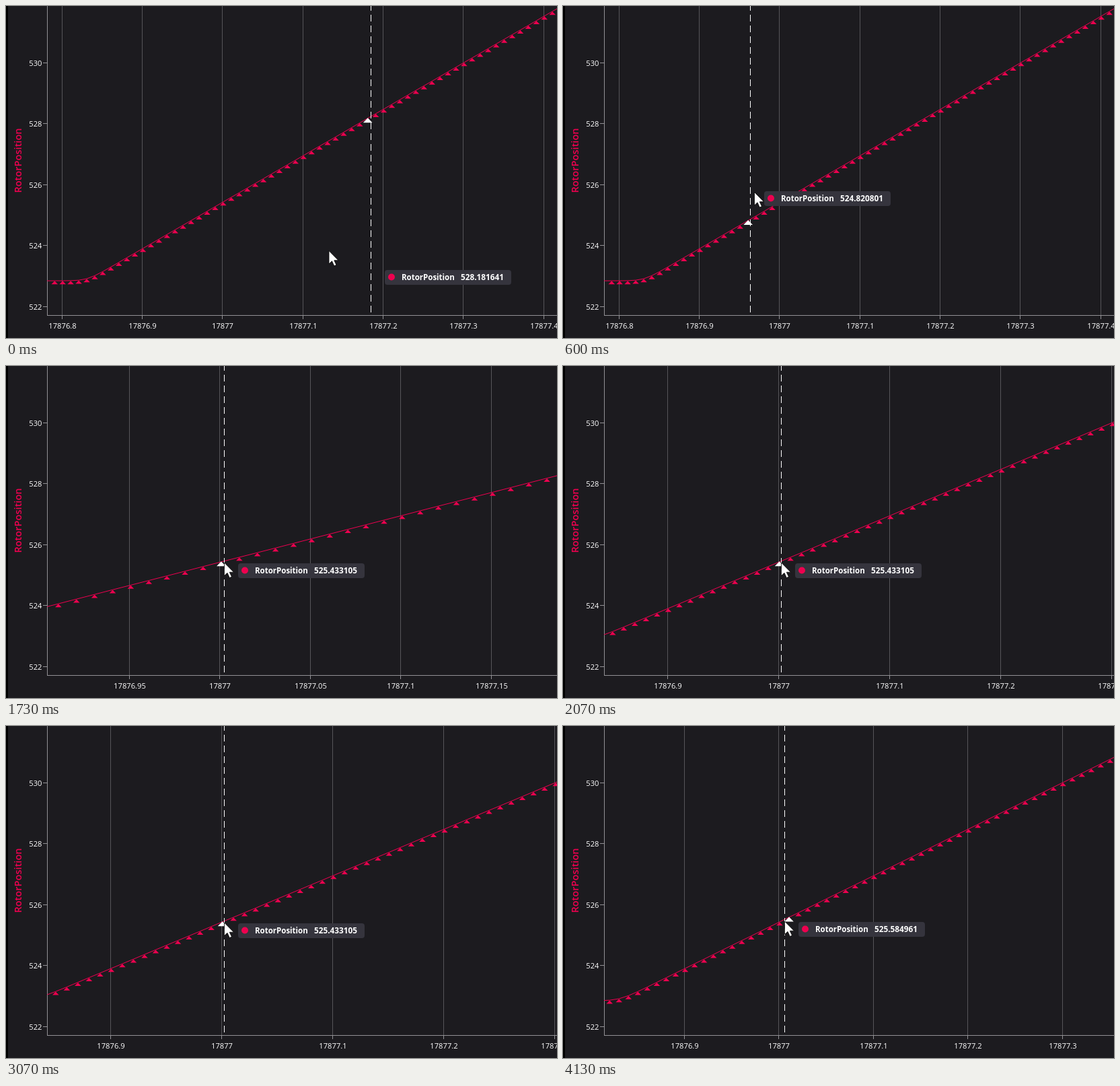
An HTML page with a canvas for the animation above (5340 ms loop, 819x493 px).

```html
<!DOCTYPE html>
<html lang="en">
<head>
<meta charset="utf-8">
<title>Rotor position chart</title>
<style>
  html, body { margin: 0; width: 100%; height: 100%; overflow: hidden; background: #1c1b1f; }
  canvas { display: block; }
</style>
</head>
<body>
<canvas id="chart" width="819" height="493"></canvas>
<script>
const ctx = document.getElementById('chart').getContext('2d');
const W = 819, H = 493, LEFT = 61, BOTTOM = 459, LOOP = 5340;
const RED = '#ee004f', AXIS = '#929195', GRID = '#565559';
const FONT = '"Open Sans", "Noto Sans", sans-serif';

// Time is counted in ticks, 15 per second
const ramp = (tick, from, to) => Math.min(1, Math.max(0, (tick - from) / (to - from)));

// Decaying swing to the lower left, a way back up the curve, then two small drifts
function pointer(tick) {
  const swing = 0.55 ** tick, back = ramp(tick, 8, 13);
  const settle = ramp(tick, 17, 22), nudge = ramp(tick, 56, 62);
  return {
    x: Math.round(264 + 278 * swing + 63 * back - 3 * settle + 5 * nudge),
    y: Math.round(270 + 122 * swing + 24.4 * back - settle - 2 * nudge)
  };
}

// Bursts of mouse wheel steps: in, out, in twice, out
function zoomLevel(tick) {
  const burst = (steps, from, to) => Math.round(steps * ramp(tick, from, to));
  return burst(5, 20, 26) - burst(7, 28, 36) + burst(3, 41, 43)
    + burst(3, 45, 48) - burst(3, 50, 52);
}

// Position of sample i, counted from 17877 in steps of 0.01:
// rest, soft start, steady rise with a slight ripple, rounded to encoder counts
function sample(i) {
  const rest = 522.84, soft = 0.1;
  const rise = 525.433105 + 0.1527 * i - 0.0024 * Math.sin(0.541 * i) ** 2 - rest;
  return Math.round((rest + soft * Math.log1p(Math.exp(rise / soft))) * 2048) / 2048;
}
const yOf = v => 446 - (v - 522) * 45.19;

function niceStep(raw) {
  const base = 10 ** Math.floor(Math.log10(raw)), f = raw / base;
  return base * (f < 1.5 ? 1 : f < 2.5 ? 2 : f < 4 ? 3 : f < 7 ? 5 : 10);
}

function line(color, x1, y1, x2, y2) {
  ctx.strokeStyle = color;
  ctx.lineWidth = 1;
  ctx.beginPath();
  ctx.moveTo(x1, y1);
  ctx.lineTo(x2, y2);
  ctx.stroke();
}

function text(str, x, y, font, align = 'left', color = '#fff') {
  ctx.font = `${font} ${FONT}`;
  ctx.textAlign = align;
  ctx.fillStyle = color;
  ctx.fillText(str, x, y);
}

function triangle(x, y, half, height, color) {
  ctx.fillStyle = color;
  ctx.beginPath();
  ctx.moveTo(x, y);
  ctx.lineTo(x + half, y + height);
  ctx.lineTo(x - half, y + height);
  ctx.fill();
}

function drawAxes(x0, scale) {
  const step = niceStep((W - LEFT) / scale / 5);
  const first = Math.ceil((LEFT - x0) / scale / step);
  for (let m = first; x0 + m * step * scale < W; m++) {
    const x = Math.floor(x0 + m * step * scale) + 0.5;
    line(GRID, x, 0, x, BOTTOM);
    line(AXIS, x, BOTTOM, x, BOTTOM + 6);
    text(+(17877 + m * step).toFixed(2), x + 0.5, 479, '500 11.2px', 'center');
  }
  for (let v = 522; v <= 530; v += 2) {
    const y = Math.floor(yOf(v)) + 0.5;
    line(AXIS, 55, y, LEFT, y);
    text(v, 53.5, y + 4, '500 11.2px', 'right');
  }
  line(AXIS, LEFT + 0.5, 0, LEFT + 0.5, BOTTOM + 1);
  line(AXIS, LEFT, BOTTOM + 0.5, W, BOTTOM + 0.5);

  ctx.save();
  ctx.translate(23, 229.5);
  ctx.rotate(-Math.PI / 2);
  text('RotorPosition', 0, 0, '600 14.6px', 'center', RED);
  ctx.restore();
}

function drawSeries(xOf, scale, active) {
  const from = Math.floor((LEFT - xOf(0)) / scale * 100) - 1;
  const to = Math.ceil((W - xOf(0)) / scale * 100) + 1;
  ctx.save();
  ctx.beginPath();
  ctx.rect(LEFT, 0, W - LEFT, BOTTOM);
  ctx.clip();
  ctx.strokeStyle = RED;
  ctx.lineWidth = 1;
  ctx.beginPath();
  for (let i = from; i <= to; i++) ctx.lineTo(xOf(i), yOf(sample(i)));
  ctx.stroke();
  ctx.restore();
  for (let i = from; i <= to; i++) {
    if (xOf(i) >= LEFT && i !== active) triangle(xOf(i), yOf(sample(i)) + 0.3, 4.8, 5, RED);
  }
}

function drawTooltip(x, y, value) {
  ctx.fillStyle = '#35343d';
  ctx.beginPath();
  ctx.roundRect(x, y, 188, 22, 4);
  ctx.fill();
  ctx.fillStyle = RED;
  ctx.beginPath();
  ctx.arc(x + 10, y + 10.5, 5, 0, 7);
  ctx.fill();
  text('RotorPosition', x + 25, y + 14.5, '700 11.5px');
  text(value.toFixed(6), x + 113, y + 14.5, '700 11.8px');
}

function drawCursor(x, y) {
  ctx.save();
  ctx.translate(x, y);
  ctx.beginPath();
  ctx.moveTo(0, 0);
  ctx.lineTo(0, 19.5);
  ctx.lineTo(4.5, 15.3);
  ctx.lineTo(7.8, 22.6);
  ctx.lineTo(11, 21);
  ctx.lineTo(7.8, 14.2);
  ctx.lineTo(14, 14.2);
  ctx.closePath();
  ctx.fillStyle = '#fff';
  ctx.fill();
  ctx.strokeStyle = '#000';
  ctx.lineWidth = 0.8;
  ctx.stroke();
  ctx.restore();
}

function draw(ms) {
  const tick = Math.floor(ms * 0.015 + 0.06);
  const now = pointer(tick), next = pointer(tick + 1);
  const zoom = 0.85 ** -zoomLevel(tick);
  const scale = 1193.4 * zoom;
  // The zoom centre moves a little with the pointer after the first burst
  const x0 = tick < 29 ? 325.3 - 3.35 * zoom : 324 - 2.68 * zoom;
  const xOf = i => x0 + (i * 0.01 + 0.0008) * scale;
  const active = Math.round((now.x + 0.5 - xOf(0)) / scale * 100);

  ctx.fillStyle = '#1c1b1f';
  ctx.fillRect(0, 0, W, H);
  ctx.fillStyle = '#000';
  ctx.fillRect(0, 0, 3, H);

  drawAxes(x0, scale);
  drawSeries(xOf, scale, active);

  ctx.setLineDash([10, 6]);
  ctx.lineDashOffset = 3;
  line('#fff', now.x + 0.5, 0, now.x + 0.5, BOTTOM);
  ctx.setLineDash([]);

  const value = sample(active);
  triangle(xOf(active), yOf(value) - 0.5, 6.8, 7, '#fff');
  drawTooltip(now.x + 21, now.y, value);
  // The pointer runs half a tick ahead of the chart
  drawCursor((now.x + next.x) / 2 + 0.5, (now.y + next.y) / 2 - 1);
}

const start = performance.now();
function frame() {
  draw((performance.now() - start) % LOOP);
  requestAnimationFrame(frame);
}
frame();
</script>
</body>
</html>
```
